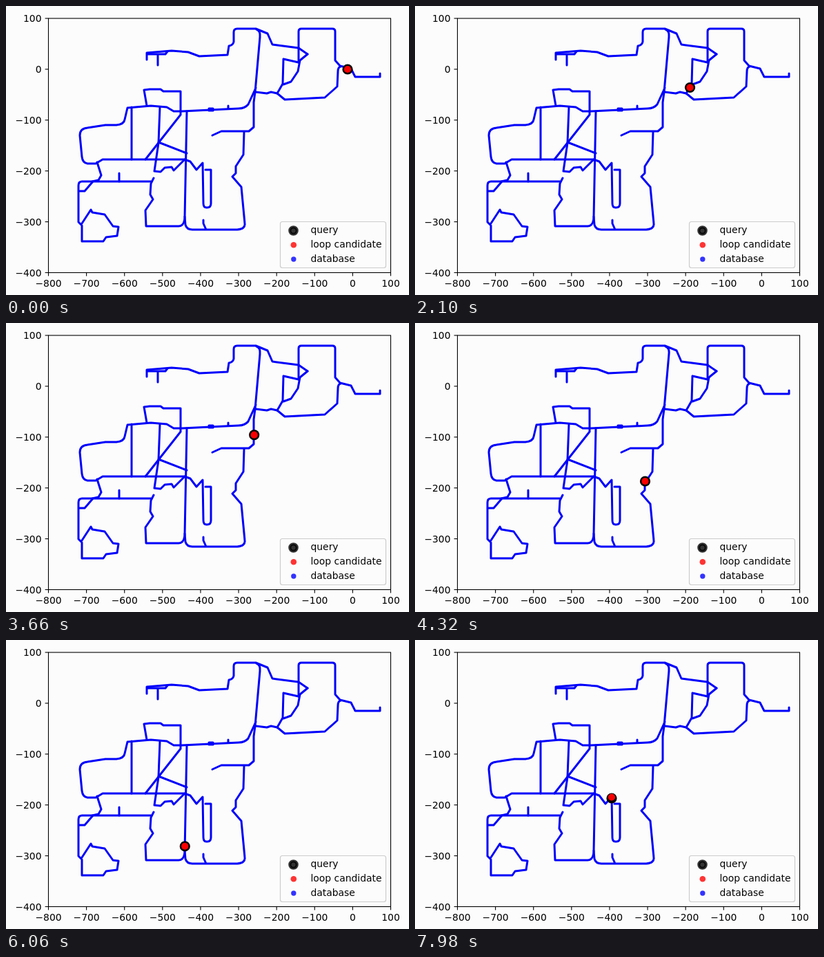
An HTML page that plays this animation: 584x420 px, repeating every 8 s.

```html
<!DOCTYPE html>
<html lang="en">
<head>
<meta charset="utf-8">
<title>Loop candidates</title>
<style>
html, body { margin: 0; width: 100%; height: 100%; overflow: hidden; background: #fcfcfc; }
svg { display: block; }
text { font: 13.89px "DejaVu Sans", sans-serif; fill: #000; }
#track path { fill: none; stroke: #0000fa; stroke-width: 3; stroke-linecap: round; stroke-linejoin: round; }
</style>
</head>
<body>
<svg id="plot" width="584" height="420" viewBox="0 0 584 420">
  <rect width="584" height="420" fill="#fcfcfc"/>
  <g id="track">
    <path d="M542 98V103H506L500 91 484 87 477 79V37Q477 33 473 33H428Q424 33 424 37V82"/>
    <path d="M485 88Q481 89 481 95L480 117 462 133 404 136 393 127 384 125 378 127 362 125"/>
    <path d="M437 70L424 61 386 56 379 40 362 33H335Q330 33 330 38V52Q329 57 323 58L321 71 280 73 264 67 240 65 204 68V78"/>
    <path d="M205 70H231L234 66M220 70V86"/>
    <path d="M437 70L426 79 423 95 413 110 402 114M424 82L402 77 401 113 393 127"/>
    <path d="M363 34Q369 36 368 45L361 125 359 140V176L352 182H312L299 188"/>
    <path d="M362 119L351 143Q346 149 337 149L255 153H243L233 147 210 145 176 148 172 165Q171 172 160 173H144L118 177Q107 178 107 188L110 219Q111 228 118 229H130L140 223H260"/>
    <path d="M294 149h6M294 152h6M322 145v4M182 147V223M164 243V255"/>
    <path d="M223 147L221 199 215 240 224 241 230 235 240 234 243 239 258 224"/>
    <path d="M253 158V124H228L224 121H208L200 122 204 145M253 158L202 223M221 198L262 214"/>
    <path d="M262 153L259 308Q258 320 250 320H203L202 297 213 281 209 274 210 258 214 250"/>
    <path d="M210 255H110Q105 255 105 261V314L110 319V342H141L145 336 161 334 163 321 155 320 143 303 125 300 123 296 110 316"/>
    <path d="M126 255L114 269H106M125 255L134 253 138 246 132 227"/>
    <path d="M259 223L267 226 276 238 285 228 286 287Q286 293 291 293Q297 293 297 287V238H289"/>
    <path d="M259 306L260 318Q262 325 270 325H335Q347 324 346 316L341 263 328 248 333 243V233L344 216 345 183M286 311V316L290 325"/>
  </g>
  <g id="axes" stroke="#000" stroke-width="1.1"></g>
  <g id="labels"></g>
  <rect x="397.5" y="313.5" width="153" height="67" rx="3" fill="#fdfdfd" fill-opacity=".8" stroke="#ccc" stroke-width="1.2"/>
  <circle cx="416.5" cy="326.5" r="5.2" fill-opacity=".8" stroke="#000" stroke-opacity=".8" stroke-width="4.2"/>
  <circle cx="416.8" cy="347.3" r="4.3" fill="#f33"/>
  <circle cx="416.8" cy="368" r="3.7" fill="#33f"/>
  <text x="441.5" y="330">query</text>
  <text x="441.5" y="351">loop candidate</text>
  <text x="441.5" y="372">database</text>
  <circle id="query" r="7.6"/>
  <circle id="match" r="5.1" fill="#fb0000"/>
</svg>
<script>
const NS = "http://www.w3.org/2000/svg";
const get = id => document.getElementById(id);

function add(parent, tag, attrs, text) {
  const el = document.createElementNS(NS, tag);
  for (const k in attrs) el.setAttribute(k, attrs[k]);
  if (text !== undefined) el.textContent = text;
  return get(parent).appendChild(el);
}

const BOX = { x: 61.5, y: 18, w: 496, h: 369.5 };
const bottom = BOX.y + BOX.h;
const format = v => String(v).replace("-", "\u2212");

add("axes", "rect", { x: BOX.x, y: BOX.y, width: BOX.w, height: BOX.h, fill: "none" });
for (let v = -800; v <= 100; v += 100) {
  const x = BOX.x + (v + 800) / 900 * BOX.w;
  add("axes", "path", { d: `M${x} ${bottom}v4.9` });
  add("labels", "text", { x, y: 408, "text-anchor": "middle" }, format(v));
}
for (let v = -400; v <= 100; v += 100) {
  const y = BOX.y + (100 - v) / 500 * BOX.h;
  add("axes", "path", { d: `M${BOX.x} ${y}h-4.9` });
  add("labels", "text", { x: 51.5, y: y + 5.2, "text-anchor": "end" }, format(v));
}

const STEP = 60, LOOP = 8000;

// Waypoints of the query: [step, x, y]
const ROUTE = [
  [0, 495, 92], [2, 478, 82], [8, 477, 33], [14, 423.5, 33],
  [19, 423.5, 47], [21, 422, 59], [25, 386, 56], [28, 378, 54],
  [31, 402, 78], [34, 404, 110], [36, 393, 127], [39, 361, 126], [41, 349, 147], [43, 323, 149],
  [45, 350, 147], [48, 359, 181], [51, 359.5, 142], [52, 361, 127], [56, 404, 120],
  [59, 361, 126], [62, 359, 181], [65, 303, 185], [68, 344, 183], [71, 342, 217],
  [72, 333.5, 230], [76, 340, 262], [84, 342, 323],
  [89, 301, 323], [96, 262, 323], [100, 260, 293], [104, 257, 320], [112, 202.5, 318],
  [115, 212, 283], [117, 212, 248], [121, 203, 297], [122, 204, 320], [126, 259.5, 312],
  [131, 261, 228], [133, 285, 230]
];

// Offset of the candidate from the query: [step, dx, dy]
const OFFSET = [[0, 0, 0], [84, 0, 0], [89, 2.5, 2], [94, 0, 0], [131, 0, 0], [133, 0, -1.5]];

function at(keys, s) {
  let i = 1;
  while (i < keys.length - 1 && keys[i][0] < s) i++;
  const [s0, x0, y0] = keys[i - 1], [s1, x1, y1] = keys[i];
  const k = (s - s0) / (s1 - s0);
  return [x0 + (x1 - x0) * k, y0 + (y1 - y0) * k];
}

function place(id, x, y) {
  get(id).setAttribute("cx", x);
  get(id).setAttribute("cy", y);
}

function draw(ms) {
  const step = Math.floor((ms % LOOP) / STEP);
  const [x, y] = at(ROUTE, step), [dx, dy] = at(OFFSET, step);
  place("query", x, y);
  place("match", x + dx, y + dy);
}

const start = performance.now();
function tick() {
  draw(performance.now() - start);
  requestAnimationFrame(tick);
}
tick();
</script>
</body>
</html>
```
